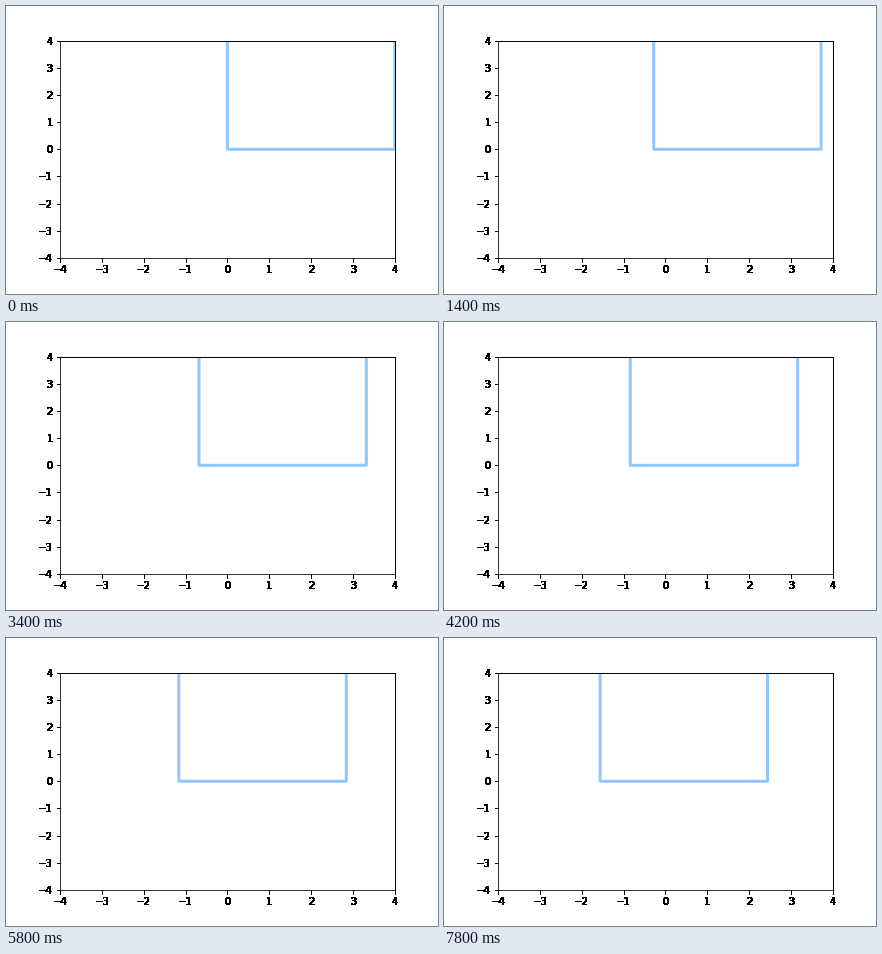
Animation, 432 px wide and 288 px high, one loop 8 s. Source, as a matplotlib script:

```python
import numpy as np
import matplotlib.pyplot as plt
from matplotlib.animation import FuncAnimation

FRAMES = 40
INTERVAL = 200
STEP = 0.04  # shift to the left per frame, in data units
SIDE = 4
LIMIT = 4

plt.rcParams.update({"font.family": "DejaVu Sans", "font.size": 10})


def harden(image, dpi):
    """Turn every touched pixel solid black, giving heavy, unsmoothed text."""
    solid = np.zeros_like(image)
    solid[..., 3] = image[..., 3] > 0
    return solid, 0, 0


fig = plt.figure(figsize=(6, 4), dpi=72, facecolor="white")
fig.subplots_adjust(left=0.125, right=0.9, bottom=0.125, top=0.88)
ax = fig.add_subplot(xlim=(-LIMIT, LIMIT), ylim=(-LIMIT, LIMIT))

ticks = range(-LIMIT, LIMIT + 1)
ax.set_xticks(ticks)
ax.set_yticks(ticks)
for axis in (ax.xaxis, ax.yaxis):
    axis.set_agg_filter(harden)
for side in ("top", "right"):
    ax.spines[side].set_linewidth(1)

box_x = np.array([0, 0, SIDE, SIDE])
box_y = np.array([2 * SIDE, 0, 0, 2 * SIDE])
box, = ax.plot([], [], color="#92c6ff", lw=3, snap=False)


def draw(i):
    box.set_data(box_x - STEP * i, box_y)
    return box,


anim = FuncAnimation(fig, draw, frames=FRAMES, interval=INTERVAL,
                     init_func=lambda: draw(0), repeat=True, repeat_delay=0)
plt.show()
```
